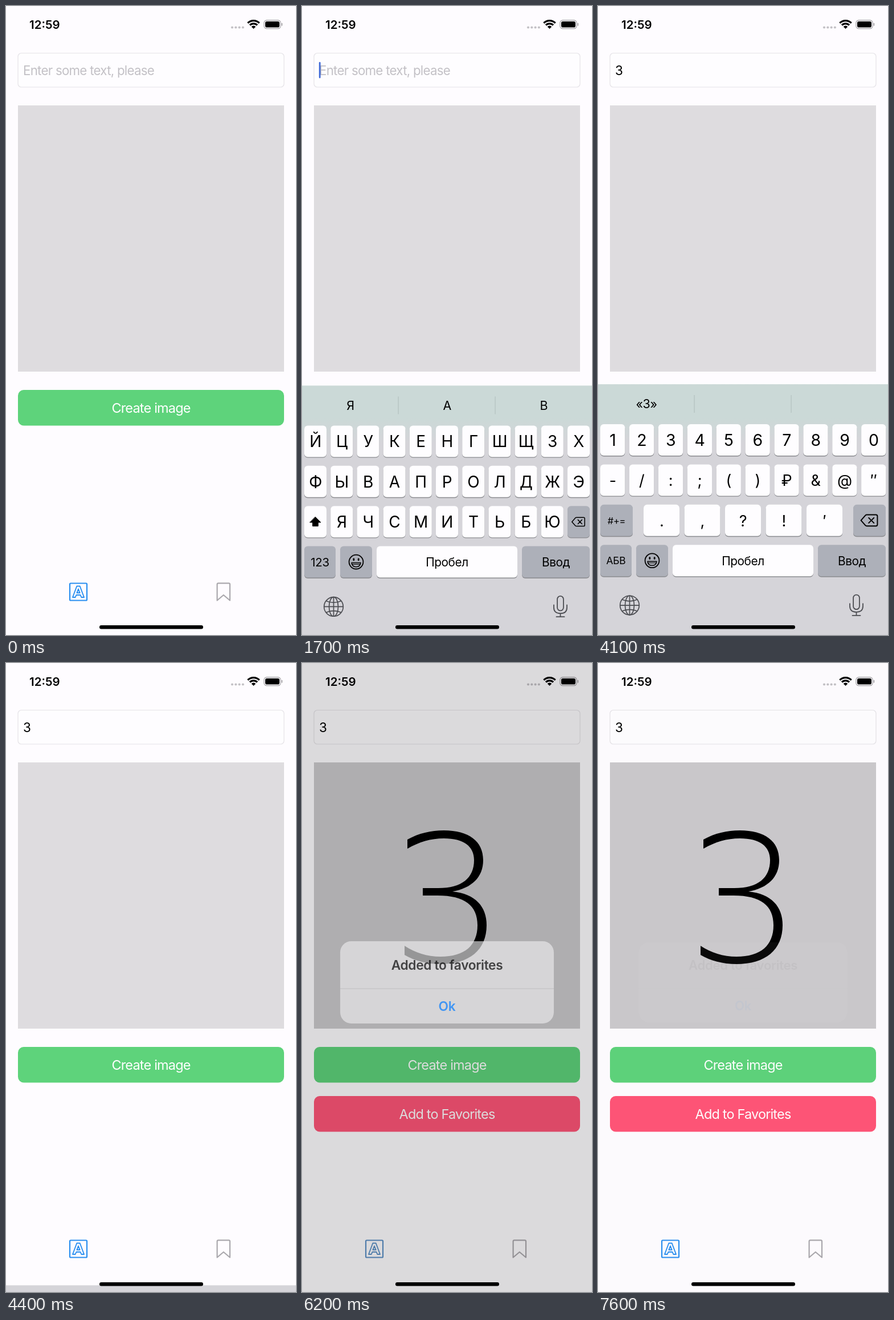
Recreate the animation shown at these times as an HTML page with a canvas. Size 509 by 1101 pixels, loop 8000 ms.

```html
<!DOCTYPE html>
<html lang="en">
<head>
<meta charset="utf-8">
<title>Text to image</title>
<style>
  html, body { margin: 0; width: 100%; height: 100%; overflow: hidden; background: #fefcff; }
  canvas { display: block; width: 509px; height: 1101px; }
</style>
</head>
<body>
<canvas id="stage"></canvas>
<script>
const W = 509, H = 1101, LOOP = 8000;
const KEY_TOP = 662;
const canvas = document.getElementById('stage');
const ctx = canvas.getContext('2d');
const dpr = window.devicePixelRatio || 1;
canvas.width = W * dpr;
canvas.height = H * dpr;

const clamp = (v, a = 0, b = 1) => Math.min(b, Math.max(a, v));
const ramp = (t, a, b) => clamp((t - a) / (b - a));

// critically damped spring, 0 to 1
function spring(t, start, rate = 18.26) {
  const x = Math.max(0, t - start) / 1000 * rate;
  return 1 - (1 + x) * Math.exp(-x);
}

function box(x, y, w, h, r, fill, stroke, lw = 1) {
  ctx.beginPath();
  ctx.roundRect(x, y, w, h, r);
  if (fill) { ctx.fillStyle = fill; ctx.fill(); }
  if (stroke) { ctx.strokeStyle = stroke; ctx.lineWidth = lw; ctx.stroke(); }
}

// cy is the middle of the capital letters
function text(s, x, cy, size, color, { align = 'center', weight = 400, track = -0.02 } = {}) {
  ctx.font = `${weight} ${size}px Inter, "Noto Sans", sans-serif`;
  ctx.letterSpacing = track * size + 'px';
  ctx.textAlign = align;
  ctx.fillStyle = color;
  ctx.fillText(s, x, cy + size * 0.364);
}

function line(d, color, lw, fill) {
  const p = new Path2D(d);
  if (fill) { ctx.fillStyle = fill; ctx.fill(p); }
  if (color) { ctx.strokeStyle = color; ctx.lineWidth = lw; ctx.stroke(p); }
}

function at(x, y, draw, scale = 1) {
  ctx.save();
  ctx.translate(x, y);
  ctx.scale(scale, scale);
  draw();
  ctx.restore();
}

function disc(x, y, r, color) {
  ctx.beginPath();
  ctx.arc(x, y, r, 0, 7);
  ctx.fillStyle = color;
  ctx.fill();
}

function statusBar() {
  text('12:59', 41, 32.5, 20.5, '#000', { align: 'left', weight: 600, track: 0 });
  for (let i = 0; i < 4; i++) disc(397 + i * 6.3, 37.5, 2.1, '#c4c2c6');
  ctx.save();
  ctx.beginPath();
  ctx.moveTo(434.5, 40);
  ctx.lineTo(419.5, 25);
  ctx.lineTo(419.5, 15);
  ctx.lineTo(449.5, 15);
  ctx.lineTo(449.5, 25);
  ctx.clip();
  ctx.strokeStyle = '#000';
  ctx.lineWidth = 3.2;
  for (const r of [14.4, 9.2]) {
    ctx.beginPath();
    ctx.arc(434.5, 40, r, Math.PI, 0);
    ctx.stroke();
  }
  disc(434.5, 40, 5.4, '#000');
  ctx.restore();
  box(453, 25, 29, 14.6, 4.5, null, '#a4a2a6', 1.3);
  box(455, 27, 25, 10.6, 2.8, '#000');
  box(483.6, 29.8, 1.6, 5, 1, '#a4a2a6');
}

function bigDigit() {
  line('M185 309C205 298 226 293 249 293C293 293 318 312 318 345C318 375 298 394 264 400' +
    'C304 404 324 426 324 459C324 502 294 527 243 527C219 527 197 521 180 511V495' +
    'C198 507 220 514 243 514C286 514 308 494 308 459C308 425 286 407 238 407H212V394H239' +
    'C281 394 302 376 302 345C302 321 284 307 249 307C226 307 206 313 185 325Z', null, 0, '#000');
}

function tabs(dim) {
  const mix = (a, b) => Math.round(a + (b - a) * dim * dim);
  const blue = `rgb(${mix(42, 146)},${mix(143, 146)},${mix(240, 150)})`;
  ctx.lineJoin = 'round';
  box(112, 1010.5, 30, 30, 1.5, null, blue, 2.2);
  line('M124.3 1015.5H129.7L137 1035H132.3L130.6 1031H123.4L121.7 1035H117Z', blue, 1.9);
  line('M127 1020.5L129.6 1027.3H124.4Z', blue, 1.9);
  line('M370.6 1040.5V1012.5Q370.6 1010.4 372.7 1010.4H391Q393 1010.4 393 1012.5V1040.5L381.8 1031Z',
    '#aaa8ad', 2.2);
}

function button(label, y, color) {
  box(21, y, 467, 62.4, 10, color);
  text(label, 254.5, y + 31.5, 23.5, '#fff', { track: -0.035 });
}

function page(t, dim) {
  const typed = t >= 3300, made = t >= 5100;
  box(21, 82.5, 467, 59.5, 6, '#fefdff', '#e5e3e7', 1.2);
  if (typed) text('3', 30, 113, 22.5, '#000', { align: 'left' });
  else text('Enter some text, please', 30, 113, 22.3, '#c3c1c6', { align: 'left', track: -0.033 });

  let caret = 0;
  if (t >= 1300 && t < 4100) {
    caret = t < 2600 ? 1 - ramp(t, 2150, 2400)
      : t < 3300 ? ramp(t, 2750, 3000)
      : 1 - ramp(t, 3750, 4000);
  }
  if (caret > 0) {
    ctx.globalAlpha = caret;
    box(typed ? 45 : 29.8, 98, 2.8, 28.5, 1.4, '#426bd6');
    ctx.globalAlpha = 1;
  }

  box(21, 174, 467, 466, 0, made ? '#cbc9cc' : '#dedcdf');
  if (made) bigDigit();
  button('Create image', 672, '#5ed37b');
  if (made) button('Add to Favorites', 758, '#ff5577');
  tabs(dim);
}

function key(x, y, w, label, { size = 28, dark = false } = {}) {
  box(x, y + 1.4, w, 55, 6, '#8b8c90');
  box(x, y, w, 55, 6, dark ? '#adb0b9' : '#fefdff');
  if (label) text(label, x + w / 2, y + 27.8, size, '#000');
}

function eraseIcon(x, y, s) {
  at(x, y, () => {
    ctx.lineJoin = ctx.lineCap = 'round';
    line('M-14 0L-6.5 -8.5Q-5.5 -9.6 -4 -9.6H11.5Q14 -9.6 14 -7V7Q14 9.6 11.5 9.6H-4Q-5.5 9.6 -6.5 8.5Z',
      '#000', 1.9);
    line('M-0.8 -4.4L8 4.4M8 -4.4L-0.8 4.4', '#000', 1.9);
  }, s);
}

function smiley(x, y) {
  at(x, y, () => {
    ctx.strokeStyle = '#000';
    ctx.lineWidth = 1.8;
    ctx.beginPath();
    ctx.arc(0, 0, 12.4, 0, 7);
    ctx.stroke();
    box(-5.6, -6.5, 2.8, 4.6, 1.4, '#000');
    box(2.8, -6.5, 2.8, 4.6, 1.4, '#000');
    line('M-8 1.5H8Q7 8.6 0 8.6Q-7 8.6 -8 1.5Z', '#000', 1.5);
    line('M-7 4H7', '#000', 1.2);
  });
}

function dockIcons(y) {
  const ink = '#4c4d52';
  ctx.lineCap = 'round';
  at(55.5, y, () => {
    ctx.strokeStyle = ink;
    ctx.lineWidth = 1.7;
    for (const rx of [16.8, 8]) {
      ctx.beginPath();
      ctx.ellipse(0, 0, rx, 16.8, 0, 0, 7);
      ctx.stroke();
    }
    line('M0 -16.8V16.8M-16.8 0H16.8M-13 -10Q0 -4.5 13 -10M-13 10Q0 4.5 13 10', ink, 1.7);
  });
  at(453.5, y, () => {
    box(-5.4, -18.5, 10.8, 25.5, 5.4, null, ink, 1.8);
    line('M-11.5 -3V1.5Q-11.5 11.8 0 11.8Q11.5 11.8 11.5 1.5V-3M0 12V17.8M-7 17.8H7', ink, 1.8);
  });
}

function letterRows(y) {
  ['ЙЦУКЕНГШЩЗХ', 'ФЫВАПРОЛДЖЭ', ' ЯЧСМИТЬБЮ '].forEach((row, r) => {
    [...row].forEach((ch, i) => {
      const erase = r === 2 && i === 10;
      key(4 + i * 46.2, y + r * 70.4, 39, ch.trim(), { dark: erase });
    });
  });
  at(23.5, y + 168.5, () => line('M0 -8.5L9.5 1H4.8V7.5H-4.8V1H-9.5Z', '#000', 1, '#000'));
  eraseIcon(485, y + 168.5, 0.8);
}

function digitRows(y) {
  ['1234567890', '-/:;()₽&@″'].forEach((row, r) => {
    [...row].forEach((ch, i) => key(4 + i * 50.9, y + r * 70.4, 43.3, ch, { size: r ? 27 : 28.5 }));
  });
  const y3 = y + 140.8;
  key(4, y3, 57, '#+=', { size: 16.5, dark: true });
  [...'.,?!′'].forEach((ch, i) => key(80 + i * 71.5, y3, 63, ch, { size: 27 }));
  key(448, y3, 57, '', { dark: true });
  eraseIcon(476, y3 + 27.5, 1.03);
}

function keyboard(t) {
  const shown = t < 4100 ? spring(t, 1300) : 1 - spring(t, 4100);
  if (shown < 0.0005) return;
  const top = KEY_TOP + (1 - shown) * (H - KEY_TOP);
  // the green button tints the translucent panel from below
  const tint = ctx.createLinearGradient(0, 655, 0, 765);
  tint.addColorStop(0, '#cbd9d7');
  tint.addColorStop(0.6, '#cbd9d7');
  tint.addColorStop(1, '#d5d4d9');
  ctx.fillStyle = tint;
  ctx.fillRect(0, top, W, H - top + 1);

  const hints = t < 3400 ? ['Я', 'А', 'В'] : ['«3»', '', ''];
  hints.forEach((s, i) => text(s, 85 + i * 169.7, top + 34.5, 21.5, '#000'));
  for (const x of [168.5, 338.5]) box(x, top + 19, 1.2, 31, 0, '#b3c1bf');

  const digits = t >= 2100;
  const y = top + 70, y4 = y + 211.2;
  (digits ? digitRows : letterRows)(y);
  key(4, y4, 55, digits ? 'АБВ' : '123', { size: digits ? 17.5 : 20.5, dark: true });
  key(67, y4, 56, '', { dark: true });
  smiley(95, y4 + 27.5);
  key(131, y4, 247, 'Пробел', { size: 20.8 });
  key(386, y4, 119, 'Ввод', { size: 20.8, dark: true });
  dockIcons(top + 387);
}

function alertBox(t, shown) {
  ctx.fillStyle = `rgba(0,0,0,${0.2 * shown})`;
  ctx.fillRect(0, 0, W, H);
  const scale = t < 7000 ? 1 + 0.075 * (1 - shown) : 1;
  at(254.5, 559, () => {
    ctx.globalAlpha = shown;
    box(-183.2, -70.3, 366.4, 140.6, 19, 'rgba(237,236,238,0.92)');
    box(-183.2, 10.2, 366.4, 1, 0, '#b4b2b6');
    text('Added to favorites', 0, -30, 22.2, '#000', { weight: 600, track: -0.015 });
    text('Ok', 0, 41, 22.2, '#007aff', { weight: 600, track: -0.01 });
  }, scale);
}

function draw(t) {
  ctx.setTransform(dpr, 0, 0, dpr, 0, 0);
  ctx.globalAlpha = 1;
  ctx.fillStyle = '#fefcff';
  ctx.fillRect(0, 0, W, H);
  const dim = t < 7000 ? spring(t, 6070) : 1 - spring(Math.min(t, 7600), 7100, 10);
  page(t, dim);
  keyboard(t);
  statusBar();
  box(164, 1084, 182, 6.4, 3.2, '#000');
  if (dim > 0) alertBox(t, dim);
}

const begin = performance.now();
function tick() {
  draw((performance.now() - begin) % LOOP);
  requestAnimationFrame(tick);
}
tick();
</script>
</body>
</html>
```
